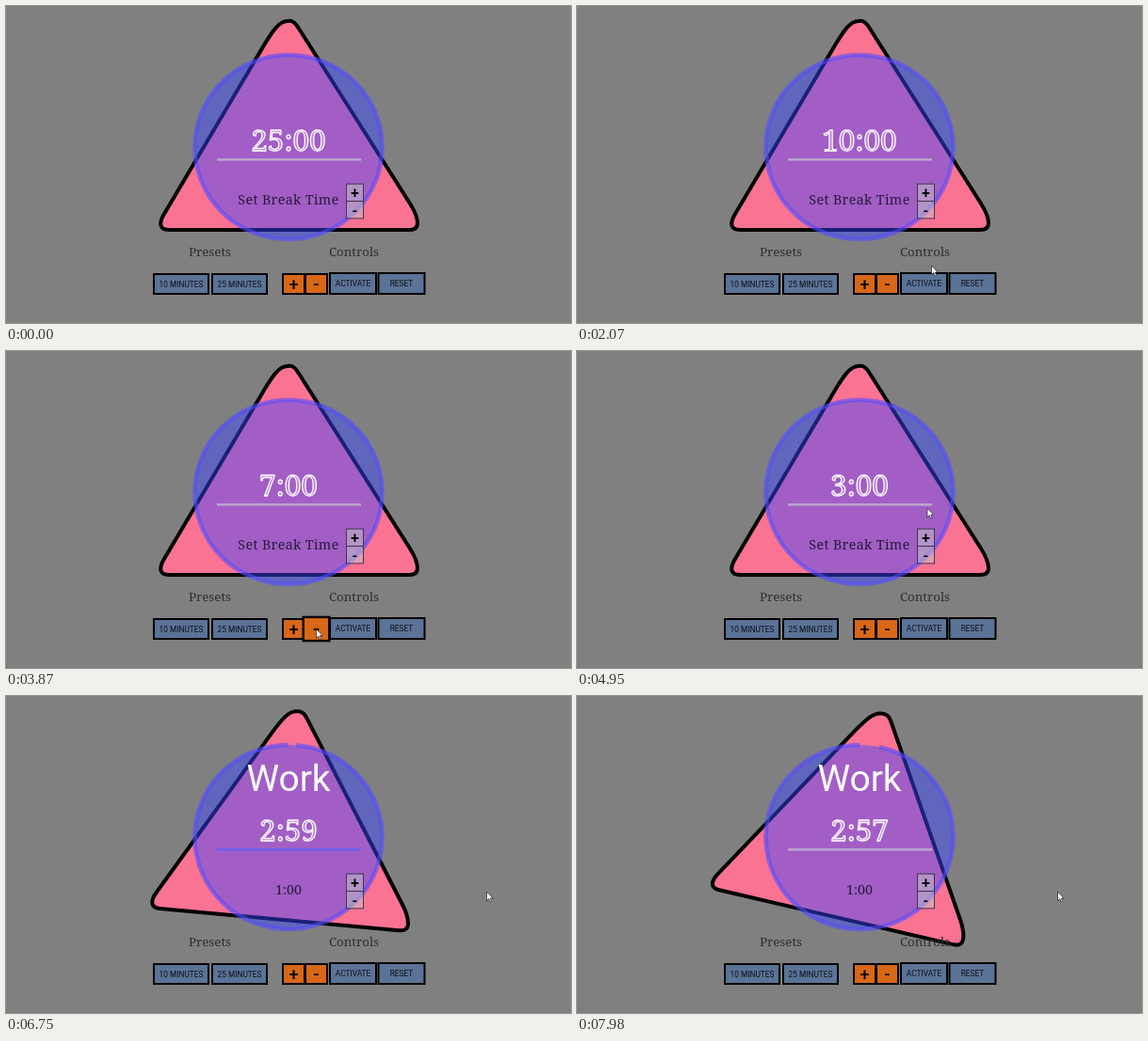
An HTML page for the animation above (8000 ms loop, 600 by 337 pixels).

```html
<!DOCTYPE html>
<html lang="en">
<head>
<meta charset="utf-8">
<title>Work timer</title>
<style>
  html, body { margin: 0; width: 100%; height: 100%; overflow: hidden; background: #808080; }
  svg { display: block; width: 100%; height: 100%; }
  text { text-anchor: middle; font-family: Roboto, sans-serif; }
  .slab { font-family: "Noto Serif", serif; }
  .label { font-size: 13.3px; font-weight: 500; fill: #2e2e2e; }
  .break { font-size: 14.2px; font-weight: 500; fill: #261a3c; }
  .clock { font-size: 31.5px; fill: #fff; fill-opacity: .25; stroke: #fff; stroke-width: 1.3; }
  .work { font-size: 39px; fill: #fff; }
  .btn rect { fill: #5b7397; stroke: #000; stroke-width: 2; }
  .btn text { font-size: 8.3px; fill: #0b0f16; }
  .btn.step rect { fill: #d86718; }
  .btn.step text { font-size: 18px; font-weight: 500; fill: #000; }
  .btn.small rect { fill: #c8c8c8; fill-opacity: .5; stroke: #41364f; stroke-width: 1; }
  .btn.small text { font-size: 16px; font-weight: 500; fill: #000; }
</style>
</head>
<body>
<svg viewBox="0 0 600 337">
  <rect width="600" height="337" fill="#808080"/>
  <path id="tri" fill="#fa7393" stroke="#000" stroke-width="4" stroke-linejoin="round"
    d="M275 40C283 27 290 16 299 16C305 15 308 19 311 24L429 210C434 218 437 226 437 231C437 236 434 238 428 238H173C163 238 162 231 168 221Z"/>
  <ellipse cx="300" cy="150" rx="99.5" ry="98" fill="#3a46ff" fill-opacity=".46"/>
  <path id="ring" d="M300 52A99.5 98 0 0 1 300 248A99.5 98 0 0 1 300 52" fill="none"
    stroke="#544cff" stroke-opacity=".6" stroke-width="4.6" pathLength="360"/>
  <text id="work" class="work" x="300" y="101">Work</text>
  <text id="clock" class="clock slab" x="300" y="154"></text>
  <rect id="line" x="224" y="162" width="153" height="2.6"/>
  <text id="rest" class="break slab" x="300" y="211"></text>
  <text class="label slab" x="216.5" y="266">Presets</text>
  <text class="label slab" x="369.5" y="266">Controls</text>
  <g id="buttons"></g>
  <path id="cursor" d="M0 0V9.6L2.2 7.6L3.7 11L5.2 10.3L3.8 7.1H6.6Z" fill="#fff" stroke="#222" stroke-width=".7"/>
</svg>
<script>
const LOOP = 8000, START = 5930;
const NS = "http://www.w3.org/2000/svg";
const $ = id => document.getElementById(id);
const clamp = (v, lo = 0, hi = 1) => Math.max(lo, Math.min(hi, v));
const smooth = v => { v = clamp(v); return v * v * (3 - 2 * v); };
const mix = (a, b, k) => a + (b - a) * k;

function make(tag, attrs, parent) {
  const el = document.createElementNS(NS, tag);
  for (const k in attrs) el.setAttribute(k, attrs[k]);
  return parent.appendChild(el);
}

function button(label, kind, cx, cy, width, height) {
  const el = make("g", { class: "btn " + kind }, $("buttons"));
  make("rect", { x: cx - width / 2, y: cy - height / 2, width, height }, el);
  make("text", { x: cx, y: cy + (kind ? 6 : 3) }, el).textContent = label;
  return { el, cx, cy };
}

const ten = button("10 MINUTES", "", 186, 295.5, 58, 21);
button("25 MINUTES", "", 248, 295.5, 58, 21);
const [plus, minus] = ["+", "-"].map((s, i) => button(s, "step", 305.5 + 24 * i, 295.5, 23, 21));
const [activate] = ["ACTIVATE", "RESET"].map((s, i) => button(s, "", 368.5 + 51.5 * i, 295, 49, 22));
const [addRest] = ["+", "-"].map((s, i) => button(s, "small", 370.5, 198.3 + 18.4 * i, 18, 18.3));

// Each stop of the pointer: where it rests and from when to when.
const stop = (from, to, x, y, target) => ({ from, to, x, y, target });
const over = (target, from, to, dx = 0, dy = 0) =>
  stop(from, to, target.cx + dx, target.cy + dy, target);

const stops = [
  stop(30, 30, 455, 190),
  over(ten, 840, 1580),
  over(activate, 2070, 2230, 8, -19),
  over(plus, 2510, 3140),
  over(minus, 3260, 4420),
  stop(4920, 4970, 372, 167),
  over(addRest, 5250, 5430),
  over(activate, 5740, 6170, 14, 2),
  stop(6640, LOOP, 510.5, 208)
];
const hovers = stops.filter(s => [ten, plus, minus].includes(s.target) || s.from === 5740);

function pointer(t) {
  const i = stops.findIndex(s => s.from > t);
  const a = stops[i < 0 ? stops.length - 1 : i - 1];
  if (!a) return null;
  const b = stops[i] || a;
  const k = smooth((t - a.to) / (b.from - a.to));
  return [mix(a.x, b.x, k), mix(a.y, b.y, k)];
}

function secondsLeft(t) {
  if (t >= START) return 179 - Math.floor((t - START) / 1000);
  if (t < 1250) return 25 * 60;
  const added = t >= 2760 ? 1 : 0;
  const removed = clamp(Math.floor((t - 3150) / 150), 0, 8);
  return 60 * (10 + added - removed);
}

const format = s => Math.floor(s / 60) + ":" + String(s % 60).padStart(2, "0");

function draw(t) {
  const run = Math.max(0, t - START) / 1000;
  const gap = run * 6;
  $("tri").setAttribute("transform", `rotate(${run * 6.4} 300 127)`);
  $("ring").setAttribute("stroke-dasharray", gap ? `0 ${gap} ${360 - gap} 0` : "none");
  $("work").setAttribute("opacity", clamp(run / 0.36));
  $("clock").textContent = format(secondsLeft(t));

  const blue = (1 - Math.cos(Math.PI * run)) / 2;
  const tint = [[185, 104], [164, 88], [207, 238]].map(([a, b]) => Math.round(mix(a, b, blue)));
  $("line").setAttribute("fill", `rgb(${tint})`);

  const set = t >= 5350;
  $("rest").textContent = set ? "1:00" : "Set Break Time";
  $("rest").setAttribute("letter-spacing", set ? 0 : 0.4);

  for (const { from, to, target: { el, cx, cy } } of hovers) {
    const k = smooth((t - from + 50) / 120) * (1 - smooth((t - to - 40) / 120));
    el.setAttribute("transform", `translate(${cx} ${cy}) scale(${1 + 0.2 * k}) translate(${-cx} ${-cy})`);
    if (k > 0 && el.nextSibling) el.parentNode.appendChild(el);
  }

  const p = pointer(t);
  $("cursor").setAttribute("visibility", p ? "visible" : "hidden");
  if (p) $("cursor").setAttribute("transform", `translate(${p})`);
}

const began = performance.now();
function tick() {
  draw((performance.now() - began) % LOOP);
  requestAnimationFrame(tick);
}
tick();
</script>
</body>
</html>
```
